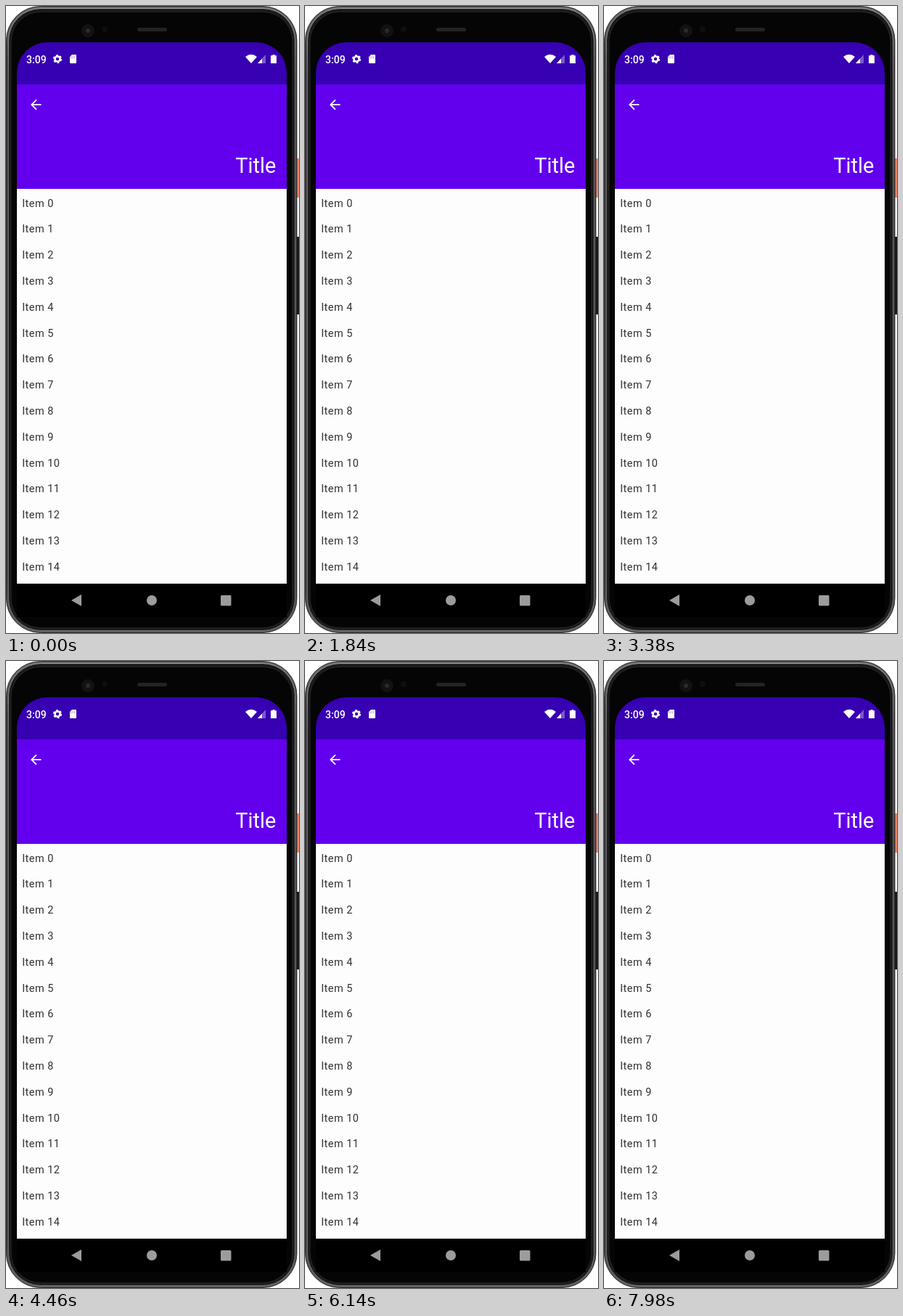
These frames come from a looping animation (404x864 px, 8000 ms). An HTML page:

```html
<!DOCTYPE html>
<html lang="en">
<head>
<meta charset="utf-8">
<title>Phone list</title>
<style>
  html, body { margin: 0; width: 100%; height: 100%; overflow: hidden; background: #fff; }
  svg { display: block; width: 404px; height: 864px; }
  text { font-family: Roboto, sans-serif; fill: #fff; }
  #items text { font-size: 14.5px; letter-spacing: .45px; fill: #303030; }
</style>
</head>
<body>
<svg viewBox="0 0 404 864">
  <defs>
    <linearGradient id="rim" x2="0" y2="1">
      <stop offset="0" stop-color="#6c6c6e"/>
      <stop offset=".08" stop-color="#4a4a4e"/>
      <stop offset=".92" stop-color="#4a4a4e"/>
      <stop offset="1" stop-color="#646466"/>
    </linearGradient>
    <linearGradient id="sheen" x2="0" y2="1">
      <stop offset="0" stop-color="#9c9c9c"/>
      <stop offset=".12" stop-color="#6a6a6c"/>
      <stop offset="1" stop-color="#6a6a6c"/>
    </linearGradient>
    <clipPath id="screen"><path d="M15 796V92A42 42 0 0 1 57 50H345A42 42 0 0 1 387 92V796Z"/></clipPath>
  </defs>

  <!-- Side buttons and body -->
  <rect x="399" y="210" width="5" height="54" fill="#f08468"/>
  <rect x="399" y="318" width="5" height="107" fill="#161618"/>
  <rect x=".5" y=".5" width="400.5" height="863" rx="47" fill="url(#rim)" stroke="#242426"/>
  <rect x="3.5" y="3.5" width="395" height="857" rx="44" fill="#1a1a1c" stroke="url(#sheen)"/>
  <rect x="7" y="8" width="388" height="849" rx="41" fill="#050506" stroke="#28282a"/>
  <circle cx="113" cy="34" r="9" fill="#121214"/>
  <circle cx="113" cy="34" r="3" fill="#2a2a2c"/>
  <circle cx="136" cy="32" r="4" fill="#0e0e10"/>
  <rect x="181" y="30" width="41" height="5" rx="2.5" fill="#232325"/>

  <!-- Screen -->
  <g clip-path="url(#screen)">
    <rect x="15" y="50" width="372" height="58" fill="#3700b3"/>
    <rect x="15" y="108" width="372" height="144" fill="#6200ee"/>
    <rect x="15" y="252" width="372" height="544" fill="#fdfdfd"/>
    <g id="items"></g>
  </g>
  <rect x="15" y="796" width="372" height="46" fill="#000"/>

  <!-- Status bar and toolbar -->
  <text x="28" y="78.5" font-size="14" font-weight="500">3:09</text>
  <g fill="none" stroke="#fff">
    <circle cx="71" cy="73" r="3.5" stroke-width="2.6"/>
    <circle cx="71" cy="73" r="5.2" stroke-width="1.8" stroke-dasharray="2.9 2.545"/>
  </g>
  <g fill="#fff">
    <path d="M91 67H96Q97 67 97 68V78Q97 79 96 79H89Q88 79 88 78V70Z"/>
    <path d="M330 70Q338 63.5 346 70L338 79Z"/>
    <path d="M347 79L358 67V79Z" opacity=".35"/>
    <path d="M347 79L353 72.5V79Z"/>
    <path d="M367.5 67H370.5V68.3H373V79H365V68.3H367.5Z"/>
    <path transform="translate(30.4 125.1) scale(.905)" d="M20 11H7.83l5.59-5.59L12 4l-8 8 8 8 1.41-1.41L7.83 13H20v-2z"/>
  </g>
  <path d="M89.5 69.3v3M91.8 69.3v3M94.2 69.3v3" stroke="#3700b3" stroke-width=".8" opacity=".5"/>
  <text x="372.5" y="229.5" font-size="29" text-anchor="end">Title</text>

  <!-- Navigation -->
  <g fill="#9c9c9c">
    <path d="M90 819L104 811V827Z"/>
    <circle cx="201" cy="819" r="7"/>
    <rect x="296" y="812" width="14.5" height="14.5" rx="1.5"/>
  </g>
</svg>
<script>
  // The scene rests in one pose for the whole loop.
  const items = document.getElementById("items");
  for (let i = 0; i < 15; i++) {
    const row = document.createElementNS(items.namespaceURI, "text");
    row.setAttribute("x", 22.2);
    row.setAttribute("y", 276.5 + i * 35.8);
    row.textContent = `Item ${i}`;
    items.append(row);
  }
</script>
</body>
</html>
```
